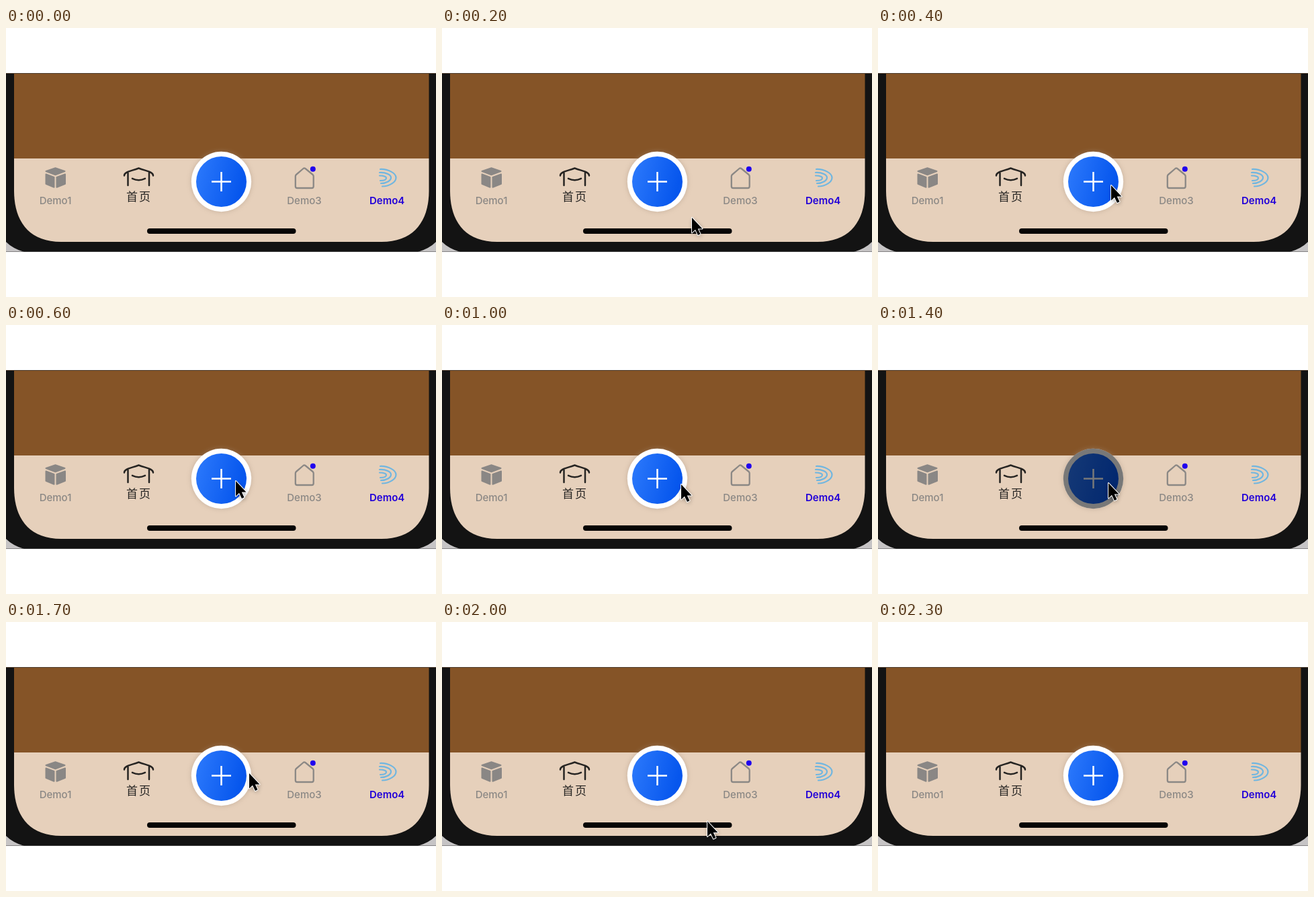
Write an HTML page that moves like this. It is 640 px wide and 400 px high and loops after 2400 ms.

```html
<!DOCTYPE html>
<html lang="en">
<meta charset="utf-8">
<title>Tab bar</title>
<style>
  html, body { margin: 0; width: 100%; height: 100%; overflow: hidden; background: #fff; }
  svg { display: block; width: 640px; height: 400px; }
  text { font: 500 15px Inter, Roboto, sans-serif; text-anchor: middle; fill: #8b8885; }
  .line { fill: none; stroke-linecap: round; stroke-linejoin: round; }
</style>
<svg viewBox="0 0 640 400">
  <defs>
    <clipPath id="view"><rect y="67" width="640" height="266"/></clipPath>
    <clipPath id="screen"><path d="M12 67V242C12 286 33 318 82 318H559C608 318 629.500 286 629.500 242V67Z"/></clipPath>
    <linearGradient id="blue" y2=".25">
      <stop stop-color="#2d7afc"/><stop offset="1" stop-color="#0656ed"/>
    </linearGradient>
    <filter id="glow" x="-50%" y="-50%" width="200%" height="200%"><feGaussianBlur stdDeviation="3"/></filter>
  </defs>
  <g clip-path="url(#view)">
    <rect y="67" width="640" height="266" fill="#c6c4c5"/>
    <path d="M0 67H640V318Q630 328 613 333H27Q10 328 0 318Z" fill="#131313"/>
    <path d="M0 332.500H640" stroke="#555" stroke-opacity=".6"/>
    <g clip-path="url(#screen)">
      <rect y="67" width="640" height="127" fill="#855427"/>
      <rect y="194" width="640" height="124" fill="#e6d0bb"/>
    </g>
    <path d="M0 67.500H640" stroke="#4b3a2b"/>
    <rect x="210" y="298" width="221.500" height="8" rx="4" fill="#050404"/>

    <g fill="#8a8785" stroke="#8a8785" stroke-width="2" stroke-linejoin="round">
      <path d="M73.500 208.200L87.500 213L73.500 218.200L59.500 213Z"/>
      <path d="M59.500 217.500L71.500 222V236.800L59.500 231.800Z"/>
      <path d="M88 217.500L75.500 222V236.800L88 231.800Z"/>
    </g>
    <text x="73.500" y="262">Demo1</text>

    <path class="line" stroke="#262422" stroke-width="2.500"
      d="M176 219.500C176 213.500 186 213 197.500 208.500C209 213 219 213.500 219 219.500M181.500 215V234M213 215V234M188 223.800Q197.500 228.500 207 223.800"/>
    <text x="198" y="257" style="font:400 17px 'Noto Sans CJK SC','Noto Sans CJK',sans-serif;letter-spacing:2px;fill:#262422">首页</text>

    <path class="line" stroke="#8b8885" stroke-width="2.300"
      d="M430.800 220.500Q430.800 219 432 218L442.500 209Q444 207.800 445.500 209L456.500 218Q457.700 219 457.700 220.500V235.500Q457.700 238 455.200 238H433.300Q430.800 238 430.800 235.500Z"/>
    <circle cx="456.800" cy="209.800" r="4" fill="#2000ee"/>
    <text x="444" y="262">Demo3</text>

    <path class="line" stroke="#70b6e0" stroke-width="2.200"
      d="M557 210C569 209.500 580.500 216 580.500 222.500C580.500 229 571 235.500 560 235.500M556 215C566 214.500 573 218.500 573 222.500C573 227 566 231 558 231M556 219.500C562 219.500 566 221 566 223C566 225.500 562 227 557 227"/>
    <text x="567.200" y="262" style="font-weight:600;fill:#2200d8">Demo4</text>

    <circle cx="320.500" cy="228.500" r="46" fill="#a58f7c" opacity=".35" filter="url(#glow)"/>
    <circle cx="320.500" cy="228.500" r="44.700" fill="#fff"/>
    <circle cx="320.500" cy="228.500" r="37.500" fill="url(#blue)"/>
    <path d="M306 228.500H335M320.500 214V243" stroke="#fff" stroke-width="2.500"/>
    <circle id="shade" cx="320.500" cy="228.500" r="44.700" opacity=".53"/>

    <g id="cursor" stroke-linejoin="round">
      <path d="M1 2V25L6 20.500L10 28L14 26L10.500 18.500H17Z" opacity=".35" filter="url(#glow)"/>
      <path d="M0 0V22.500L5 17.800L9 26L12.500 24.300L8.800 16.500H15.500Z" stroke="#fff" stroke-width="2"/>
      <path d="M0 0V22.500L5 17.800L9 26L12.500 24.300L8.800 16.500H15.500Z"/>
    </g>
  </g>
</svg>
<script>
  const cursor = document.getElementById('cursor'), shade = document.getElementById('shade');
  // time, x, y of the pointer tip
  const path = [
    [100, 390, 325], [200, 372, 282], [300, 355, 248], [400, 347, 234], [600, 342, 232],
    [1000, 356, 237], [1400, 343, 235], [1700, 362, 225], [1900, 386, 258], [2100, 404, 335]
  ];

  function draw(now) {
    const t = Math.floor(now % 2400 / 100) * 100;
    const i = path.findIndex(p => p[0] > t);
    const moving = i > 0;
    cursor.style.display = moving ? '' : 'none';
    if (moving) {
      const [t0, x0, y0] = path[i - 1], [t1, x1, y1] = path[i];
      const k = (t - t0) / (t1 - t0);
      cursor.setAttribute('transform', `translate(${x0 + (x1 - x0) * k} ${y0 + (y1 - y0) * k})`);
    }
    shade.style.display = t >= 1300 && t < 1500 ? '' : 'none';
  }

  const start = performance.now();
  function loop() {
    draw(performance.now() - start);
    requestAnimationFrame(loop);
  }
  loop();
</script>
</html>
```
